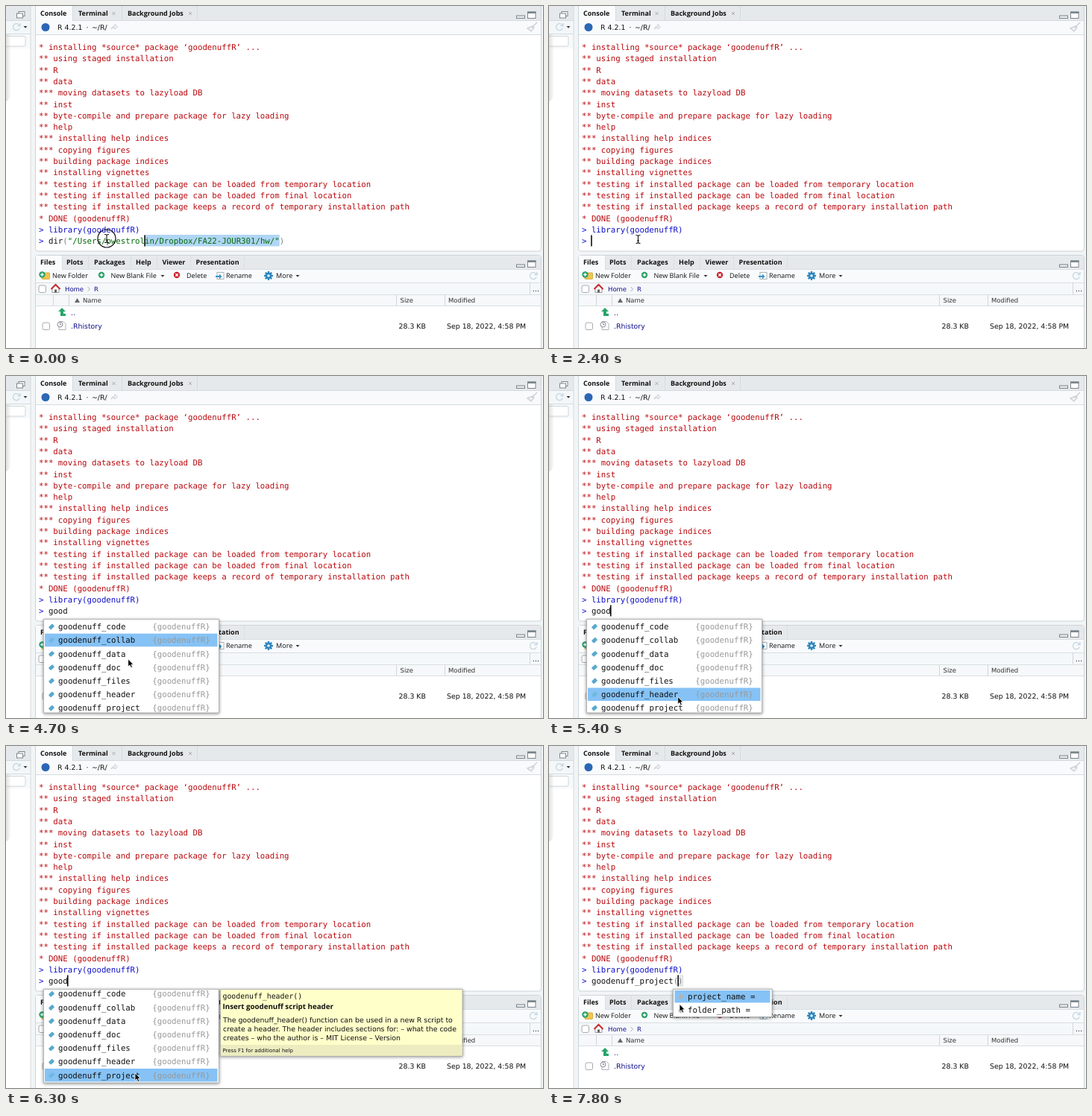
Recreate the animation shown at these times as an HTML page. Size 720 px wide and 459 px high, loop 8 s.

```html
<!DOCTYPE html>
<html lang="en">
<head>
<meta charset="utf-8">
<title>Console session</title>
<style>
html, body { margin: 0; width: 100%; height: 100%; overflow: hidden; background: #fff; }
svg { display: block; width: 100vw; height: 100vh; }
text { white-space: pre; text-rendering: geometricPrecision; fill: #111; }
.mono { font: 10.72px "DejaVu Sans Mono", monospace; }
.sig { font: 9.85px "DejaVu Sans Mono", monospace; }
.tab { font: bold 9px "Open Sans", sans-serif; }
.title { font: bold 9.75px "Open Sans", sans-serif; }
.tool { font: 9.05px "Open Sans", sans-serif; }
.body { font: 9.4px "DejaVu Sans", sans-serif; }
.head { font: 8.5px "DejaVu Sans", sans-serif; fill: #333; }
.small { font: 6.95px "DejaVu Sans", sans-serif; }
.red { fill: #b9090e; }
.blue { fill: #1010c8; }
.link { fill: #10108c; }
.green { fill: #036a07; }
.paren { fill: #778290; }
.gray { fill: #999; }
.popup { filter: drop-shadow(0 1px 2px #0007); }
</style>
</head>
<body>
<svg viewBox="0 0 720 459" preserveAspectRatio="none">
  <defs>
    <clipPath id="listClip"><rect x="51" y="327" width="234" height="124"/></clipPath>
    <linearGradient id="edge"><stop stop-color="#bbb" stop-opacity=".45"/><stop offset="1" stop-color="#bbb" stop-opacity="0"/></linearGradient>
  </defs>
  <g id="scene"></g>
  <rect id="selection" y="307" height="15.5" fill="#b0d5f5"/>
  <rect id="match" y="308" width="6.5" height="14" fill="#eee" stroke="#ccc" stroke-width=".7"/>
  <text id="input" class="mono" x="44"></text>
  <rect id="caret" y="307.5" width="1.5" height="15" fill="#000"/>
  <g id="list" class="popup"></g>
  <g id="help" class="popup"></g>
  <g id="args" class="popup"></g>
  <g id="pointer">
    <circle id="press" r="12" fill="none" stroke="#111" stroke-width="1.2"/>
    <path id="beam" d="M-3-5.5Q0-5.5 0-4Q0-5.5 3-5.5M0-4V4M-3 5.5Q0 5.5 0 4Q0 5.5 3 5.5M-1.5 2H1.5" fill="none" stroke="#111" stroke-width="1.1"/>
    <path id="arrow" d="M0 0V10L2.3 7.9L3.9 11.6L5.7 10.8L4.2 7.2H7.2Z" fill="#000" stroke="#fff" stroke-width=".8"/>
  </g>
</svg>
<script>
const $ = id => document.getElementById(id);
const text = (x, y, s, cls) => `<text x="${x}" y="${y}" class="${cls}">${s}</text>`;
const rect = (x, y, w, h, fill, extra = '') => `<rect x="${x}" y="${y}" width="${w}" height="${h}" fill="${fill}" ${extra}/>`;
const path = (d, stroke, fill = 'none', width = 1) => `<path d="${d}" stroke="${stroke}" fill="${fill}" stroke-width="${width}"/>`;
const dot = (x, y, r, fill) => `<circle cx="${x}" cy="${y}" r="${r}" fill="${fill}"/>`;
const badge = (x, y, fill, d) => dot(x, y, 4.2, fill) + path(`M${x} ${y}${d}`, '#fff', 'none', 1.4);
const PLUS = 'm-2.3 0h4.6m-2.3-2.3v4.6', CROSS = 'm-1.7-1.7l3.4 3.4m0-3.4l-3.4 3.4';
const closeMark = x => path(`M${x - 2} 8l4 4m0-4l-4 4`, '#aaa');
const dropMark = (x, y) => path(`M${x - 2.5} ${y}h5l-2.5 2.8z`, 'none', '#333');
const refresh = (x, y) => path(`M${x + 4} ${y - 2}a4.5 4.5 0 1 0 .3 3.4M${x + 5} ${y - 5}v3.6h-3.6`, '#c3d6e2', 'none', 1.3);
const checkbox = (x, y) => rect(x, y, 9.5, 9.5, '#fff', 'stroke="#aaa" rx="2"');
const windowMarks = y => rect(684.5, y + 5, 11, 3.5, '#e8ecef', 'stroke="#7b858c"') +
  rect(699.5, y, 10.5, 8.5, '#fff', 'stroke="#7b858c"') + rect(699, y - .5, 11.5, 2.5, '#7b858c');

const CHAR = 10.72 * 0.60205, LEFT = 44;
const column = n => LEFT + n * CHAR;
const baseline = row => 59 + row * 15.3;
const STRIP = '#e6e9eb';

const log = `* installing *source* package ‘goodenuffR’ ...
** using staged installation
** R
** data
*** moving datasets to lazyload DB
** inst
** byte-compile and prepare package for lazy loading
** help
*** installing help indices
*** copying figures
** building package indices
** installing vignettes
** testing if installed package can be loaded from temporary location
** testing if installed package can be loaded from final location
** testing if installed package keeps a record of temporary installation path
* DONE (goodenuffR)
> library(goodenuffR)`.split('\n');

function leftPane() {
  return rect(0, 0, 33, 20, STRIP) + rect(0, 19, 33, 18, '#f4f7f9') + rect(0, 37, 33, 20, '#f7f9fa') +
    rect(0, 57, 33, 402, '#fff') + rect(-5, 40.5, 31, 13.5, '#fff', 'stroke="#cfd6da" rx="2"') +
    path('M0 19.5H33M0 37.5H33M33 0V459', '#d3dade') +
    rect(17, 7.5, 8, 6, '#fff', 'stroke="#7b858c"') + rect(14.5, 10, 8, 6, '#fff', 'stroke="#7b858c"') +
    refresh(14, 28) + dropMark(26, 27) +
    '<path d="M0 38H7V117Q6 126 0 128Z" fill="url(#edge)"/>';
}

function consolePane() {
  const tabs = [[46, 'Console'], [97, 'Terminal'], [163, 'Background Jobs']];
  return rect(39.5, -5, 678, 334, '#fff', 'stroke="#ccd4d9" rx="3"') +
    rect(40, 0, 677, 19, STRIP) + rect(40, 0, 49, 20, '#fafbfc') + rect(40, 19, 677, 19, '#f8fafb') +
    path('M89 19.5H717M40 38.5H717M89.5 0V19M155.5 0V19M256.5 0V19', '#d3dade') +
    tabs.map(([x, s]) => text(x, 13, s, 'tab')).join('') + closeMark(144.5) + closeMark(247) + windowMarks(8) +
    dot(53, 28.5, 5.5, '#2b67b5') + text(69, 31.7, 'R 4.2.1', 'body') + text(107.5, 31.7, '·', 'body') +
    text(115, 31.7, '~/R/', 'body') +
    path('M141 31Q142 27 146 27V24.5L149.5 28L146 31V29Q143 29 141 31Z', '#c3cbd0', '#f4f6f7', .9) +
    path('M712 22L705 29M706 27L699 30L704 34L708 29Z', '#c6cdd1', '#eef1f2', 1.2) +
    log.map((s, i) => text(LEFT, baseline(i), s.replace('>', '&gt;'), 'mono ' + (s[0] === '>' ? 'blue' : 'red'))).join('');
}

function filesPane() {
  const tabs = [[46, 'Files'], [81, 'Plots'], [118, 'Packages'], [174, 'Help'], [209.5, 'Viewer'], [254.5, 'Presentation']];
  const tools = [[62, 'New Folder'], [140.5, 'New Blank File'], [242, 'Delete'], [295, 'Rename'], [362, 'More']];
  let gear = dot(352, 362, 4.3, '#2f86bd');
  for (let a = 0; a < 360; a += 45) gear += rect(350.8, 356, 2.4, 3, '#2f86bd', `transform="rotate(${a} 352 362)"`);
  return rect(39.5, 334.5, 678, 140, '#fff', 'stroke="#ccd4d9" rx="3"') +
    rect(40, 335, 677, 18, STRIP) + rect(40, 335, 35, 19, '#fafbfc') + rect(40, 353, 677, 18, '#f8fafb') +
    rect(40, 371, 677, 17, '#f5f8fa') + rect(40, 388, 677, 14, '#f6f8f9') +
    path('M75 353.5H717M40 371.5H717M40 387.5H717M40 402.5H717M75.5 335V353M110.5 335V353M167.5 335V353M202.5 335V353M247.5 335V353M319.5 335V353', '#d9dfe3') +
    path('M63.5 388V402M84.5 388V402M523.5 388V402M588.5 388V402M702.5 371V387', '#cfd6da') +
    tabs.map(([x, s]) => text(x, 347.3, s, 'tab')).join('') + windowMarks(342) +
    tools.map(([x, s]) => text(x, 365, s, 'tool')).join('') +
    rect(48, 358, 10.5, 8.5, '#f0c64e', 'stroke="#c79a28" stroke-width=".7" rx="1"') + badge(48.5, 360.5, '#28a06a', PLUS) +
    badge(128, 361, '#28a06a', PLUS) + badge(229, 361, '#c8202c', CROSS) +
    rect(283, 357.5, 9, 9, '#fff', 'stroke="#aab3b8"') + path('M281 362h5v-2.5l3.5 3.5l-3.5 3.5v-2.5h-5z', 'none', '#3795c8') +
    gear + dot(352, 362, 1.8, '#e8f2f8') + dropMark(210, 361) + dropMark(391, 361) + refresh(707, 362) +
    checkbox(44, 375) + path('M62 379V384.5H71V379', '#999', '#fff') + path('M60.5 380L66.5 374L72.5 380', '#c5282c', 'none', 2) + rect(65, 380.5, 3, 4, '#666') +
    text(79, 383.2, 'Home', 'head link') + path('M109.5 377l3 3l-3 3', '#aaa') + text(118, 383.2, 'R', 'head link') + text(706, 383, '...', 'body') +
    path('M92 398h7l-3.5-6z', 'none', '#666') + text(103, 398.4, 'Name', 'head') + text(528.5, 398.4, 'Size', 'head') + text(593, 398.4, 'Modified', 'head') +
    path('M75 405l5 5h-3v3h3v3h-7v-6h-3z', 'none', '#25a56a') + text(87, 414.5, '..', 'body link') +
    checkbox(49, 425) + path('M71 423.5h6l3 3v8h-9z', '#aab3b8', '#fff') + `<circle cx="72.5" cy="427.5" r="3.4" fill="#fff" stroke="#889"/>` + path('M72.5 425.5v2h1.7', '#667', 'none', .8) +
    text(87, 433.4, '.Rhistory', 'body link') + text(526.5, 433.4, '28.3 KB', 'body') + text(591, 433.4, 'Sep 18, 2022, 4:58 PM', 'body');
}

const tag = (x, y, fill) => rect(x - 3.5, y - 2.4, 7, 4.8, fill, `rx="1" transform="rotate(-42 ${x} ${y})"`);
const panel = (x, y, w, h, fill) => rect(x, y, w, h, fill, 'stroke="#aaa" stroke-width=".8"');
const HILITE = '#86c2f5';
const functions = ['code', 'collab', 'data', 'doc', 'files', 'header', 'project'];

function functionList(active, scroll) {
  const rows = functions.map((name, i) => {
    const y = 336.5 + i * 18.2 - scroll;
    return (i === active ? rect(52, y - 9, 231.5, 17.5, HILITE) : '') + tag(61, y, i === active ? '#6fb9dc' : '#58a9cd') +
      text(70, y + 3.6, 'goodenuff_' + name, 'mono') + text(196.3, y + 3.6, '{goodenuffR}', 'mono gray');
  });
  return panel(50.5, 326.5, 235, 125.5, '#fff') + `<g clip-path="url(#listClip)">${rows.join('')}</g>`;
}

$('scene').innerHTML = rect(0, 0, 720, 459, '#f2f5f6') + leftPane() + consolePane() + filesPane();
$('input').setAttribute('y', baseline(log.length));
$('help').innerHTML = panel(287.5, 326.5, 324.5, 89.5, '#ffffca') + rect(288, 401, 323.5, 14.5, '#ececc0') +
  text(290.5, 339, 'goodenuff_header()', 'sig') + text(290.5, 353.3, 'Insert goodenuff script header', 'title') +
  ['The goodenuff_header() function can be used in a new R script to',
   'create a header. The header includes sections for: – what the code',
   'creates – who the author is – MIT License – Version'].map((s, i) => text(291, 370.5 + 12 * i, s, 'body')).join('') +
  text(290.5, 411, 'Press F1 for additional help', 'small');
$('args').innerHTML = panel(166.5, 326.5, 132.5, 37, '#fff') + rect(168.5, 328, 128, 16.5, HILITE) +
  ['project_name =', 'folder_path ='].map((s, i) => tag(177, 336.5 + 18.2 * i, '#b0b4b8') + text(186, 340.1 + 18.2 * i, s, 'mono')).join('');

const span = (cls, s) => `<tspan class="${cls}">${s}</tspan>`;
const call = (name, arg = '') => name + span('paren', '(') + span('green', arg) + span('paren', ')');
// Each edit: start time, line content, caret column
const edits = [
  [0, call('dir', '"/Users/pwestrolin/Dropbox/FA22-JOUR301/hw/"'), 6],
  [1100, call('dir'), 6],
  [2400, '', 2],
  [3700, 'g', 3], [3800, 'go', 4], [4000, 'goo', 5], [4100, 'good', 6],
  [6800, call('goodenuff_project'), 20]
];
const dragColumns = [22, 14, 9, 6];
const hoverTimes = [4200, 4700, 4800, 4900, 5000, 5200, 6200];
const route = [
  [0, 135, 312], [300, 84, 314], [1500, 83, 315], [2200, 119.5, 313], [4300, 119.5, 313],
  [4700, 163.7, 380], [5300, 172.7, 430.5], [6100, 172.7, 430.5], [6300, 173, 439], [6700, 173, 439], [7000, 175, 346.5], [8000, 175, 346.5]
];

function pointerAt(t) {
  const i = Math.max(1, route.findIndex(p => p[0] >= t));
  const [t0, x0, y0] = route[i - 1], [t1, x1, y1] = route[i];
  const k = (t - t0) / (t1 - t0);
  return [x0 + (x1 - x0) * k, y0 + (y1 - y0) * k];
}

const show = (id, on) => $(id).style.display = on ? '' : 'none';
const between = (t, a, b) => t >= a && t < b;

function draw(t) {
  const [since, content, col] = edits.filter(e => e[0] <= t).pop();
  const caretCol = t < 400 ? dragColumns[t / 100] : col;
  $('input').innerHTML = span('blue', '&gt; ') + content;
  $('caret').setAttribute('x', column(caretCol) - .7);
  show('caret', (t - since) % 1000 < 500);
  show('selection', t < 1100);
  $('selection').setAttribute('x', column(caretCol));
  $('selection').setAttribute('width', column(50) - column(caretCol));
  show('match', between(t, 1100, 2400) || t >= 6800);
  $('match').setAttribute('x', column(col));

  const listOpen = between(t, 4200, 6800);
  show('list', listOpen);
  if (listOpen) $('list').innerHTML = functionList(hoverTimes.filter(h => h <= t).length - 1, t >= 6200 ? 3.7 : 0);
  show('help', between(t, 6200, 6500));
  show('args', t >= 7600);

  const [x, y] = pointerAt(t);
  $('pointer').setAttribute('transform', `translate(${x} ${y})`);
  show('press', t < 500);
  show('beam', y < 326);
  show('arrow', y >= 326);
}

let lastStep = -1;
const begin = performance.now();
function tick() {
  const step = Math.floor((performance.now() - begin) % 8000 / 100);
  if (step !== lastStep) draw((lastStep = step) * 100);
  requestAnimationFrame(tick);
}
tick();
</script>
</body>
</html>
```
